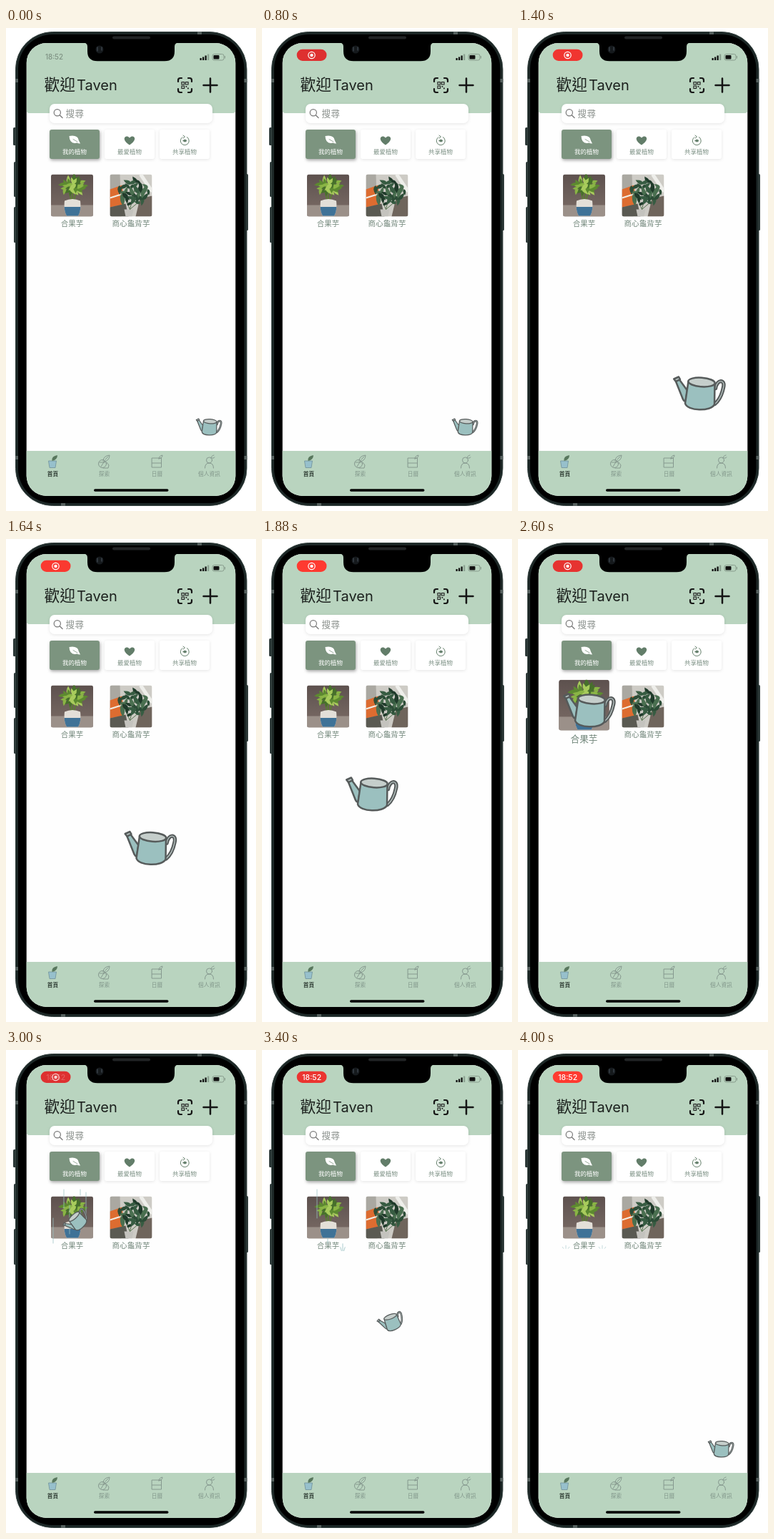
An HTML page that plays this animation: 350x675 px, repeating every 4040 ms.

```html
<!DOCTYPE html>
<html lang="zh-Hant">
<head>
<meta charset="utf-8">
<title>植物</title>
<style>
  html, body { margin: 0; width: 100%; height: 100%; overflow: hidden; background: #fff; }
  svg { display: block; }
  text { font-family: Inter, 'Noto Sans CJK TC', 'Noto Sans CJK', sans-serif; }
  .mid { text-anchor: middle; }
  .line { fill: none; stroke-linecap: round; stroke-linejoin: round; }
  .card { filter: drop-shadow(0 1px 2px rgba(0, 0, 0, .1)); }
  .on { filter: drop-shadow(1px 2px 2px rgba(0, 0, 0, .34)); }
</style>
</head>
<body>
<svg width="350" height="675" viewBox="0 0 350 675">
  <defs>
    <clipPath id="screen"><rect x="28.700" y="21" width="292.600" height="633" rx="28"/></clipPath>
    <clipPath id="photo"><rect width="59" height="59" rx="3"/></clipPath>
    <linearGradient id="wall" x2="0" y2="1"><stop stop-color="#5d514e"/><stop offset="1" stop-color="#7c6d67"/></linearGradient>
  </defs>

  <!-- phone -->
  <g fill="#2b3837">
    <rect x="10" y="139" width="5" height="25" rx="1.5"/>
    <rect x="11" y="187" width="4" height="49" rx="1.5"/>
    <rect x="11" y="250" width="4" height="50" rx="1.5"/>
    <rect x="335" y="204" width="4" height="79" rx="1.5"/>
  </g>
  <rect x="13.500" y="5.500" width="323.500" height="662" rx="52" fill="#1c2726" stroke="#34413f"/>
  <rect x="17" y="9" width="316.500" height="655" rx="48" fill="#000"/>
  <g fill="#56615f">
    <rect x="13" y="71" width="4" height="5"/><rect x="333.500" y="71" width="4" height="5"/>
    <rect x="13" y="598" width="4" height="5"/><rect x="333.500" y="598" width="4" height="5"/>
    <rect x="77" y="664" width="6" height="4"/><rect x="268" y="5" width="6" height="4"/>
  </g>
  <rect x="149" y="11.500" width="53" height="4" rx="2" fill="#222526"/>

  <g clip-path="url(#screen)">
    <rect x="28" y="21" width="294" height="633" fill="#fefefe"/>
    <rect x="28.700" y="10" width="292.600" height="109" rx="4" fill="#b9d4bf"/>
    <rect x="28" y="591" width="294" height="63" fill="#b9d4bf"/>
  </g>
  <path d="M109 20.500Q114 21 114 26V32.500Q114 46.300 128 46.300H222Q236 46.300 236 32.500V26Q236 21 241 20.500Z"/>
  <circle cx="131" cy="30" r="5.500" fill="#15191c"/>
  <path class="line" d="M128 27v5M134 27v4" stroke="#384047" stroke-width="1.500"/>

  <!-- status bar -->
  <text id="clock" class="mid" x="67.500" y="43.500" font-size="9.800" font-weight="500" fill="#7e9183">18:52</text>
  <g id="pill">
    <rect id="pillBox" x="48.700" y="29.700" width="41.800" height="16.200" rx="8"/>
    <g id="rec"><circle cx="69.500" cy="38" r="4.700" fill="none" stroke="#fff" stroke-width="1.200"/><circle cx="69.500" cy="38" r="2.200" fill="#fff"/></g>
    <text id="pillTime" class="mid" x="69.700" y="41.700" font-size="10.500" font-weight="500" fill="#fff">18:52</text>
  </g>
  <path d="M271.500 42h2.300v3h-2.300zM275 40.500h2.300v4.500h-2.300zM278.500 38.500h2.300v6.500h-2.300z" fill="#111"/>
  <path d="M282 36.500h2.300v8.500h-2.300z" fill="#8ca292"/>
  <rect x="289" y="36.500" width="16" height="8.500" rx="2.500" fill="none" stroke="#879b8c"/>
  <rect x="290.500" y="38" width="8" height="5.500" rx="1" fill="#111"/>
  <path d="M306.500 39v3.500" stroke="#879b8c"/>

  <!-- header -->
  <text x="53.500" y="87" font-size="21.700" fill="#1c211e">歡迎</text>
  <text x="99" y="87" font-size="20" fill="#1c211e">Taven</text>
  <g class="line" stroke="#151515" stroke-width="2.200">
    <path d="M241 75v-2q0-3 3-3h2M255 70h2q3 0 3 3v2M260 85v2q0 3-3 3h-2M246 90h-2q-3 0-3-3v-2"/>
    <path d="M276.500 80h19M286 70.500v19" stroke-width="2.500"/>
  </g>
  <path d="M246 75.500h3.500v3.500h-3.500zM251.500 75.500h3.500v3.500h-3.500zM246 81h3.500v3.500h-3.500z" fill="none" stroke="#222" stroke-width="1.200"/>
  <path d="M251.500 81h1.800v1.800h-1.800zM254 83.500h1.800v1.800h-1.800z" fill="#222"/>
  <rect class="card" x="61" y="106" width="228" height="27" rx="7" fill="#fff"/>
  <path class="line" d="M75.500 122l3.500 3.500" stroke="#777" stroke-width="1.300"/>
  <circle cx="71.800" cy="118.300" r="4.600" fill="none" stroke="#777" stroke-width="1.200"/>
  <text x="83.500" y="124" font-size="12.700" fill="#8b918d">搜尋</text>

  <!-- filters -->
  <rect class="on" x="61" y="142" width="70" height="41" rx="3" fill="#7c947f"/>
  <rect class="card" x="138" y="142" width="70" height="41" rx="3" fill="#fff"/>
  <rect class="card" x="215" y="142" width="70" height="41" rx="3" fill="#fff"/>
  <path d="M88.500 151Q101 149 102 157.500L104 161.500Q101 161.500 99.500 160.500Q89 163 88.500 151Z" fill="#fff"/>
  <path class="line" d="M94 155.500l6 3.500" stroke="#7c947f" stroke-width=".8"/>
  <path d="M173 163.500C159 154 169 148 173 153.500C177 148 187 154 173 163.500Z" fill="#627d69"/>
  <g class="line" stroke="#627d69" stroke-width="1">
    <path d="M247 152.500a6 6 0 1 0 6.500 0M248 150l2.500 2-2.500 2"/>
    <path d="M248 157.500q2.500-3 5 0q-2.500 3-5 0Z" fill="#627d69"/>
  </g>
  <g class="mid" font-size="8.500" fill="#7c9084">
    <text x="96" y="175.500" fill="#fff">我的植物</text>
    <text x="173" y="175.500">最愛植物</text>
    <text x="250" y="175.500">共享植物</text>
  </g>

  <!-- plants -->
  <g id="plantA">
    <g transform="translate(63 204.500)" clip-path="url(#photo)">
      <rect width="59" height="59" fill="url(#wall)"/>
      <rect y="43" width="59" height="16" fill="#9b9089"/>
      <path d="M28 36L24 18M30 36V14M32 36L38 18" fill="none" stroke="#5c7c34" stroke-width="1.800"/>
      <g id="leavesA"></g>
      <path d="M19 37Q30 32 41 37Q42.500 50 38 58H22Q17.500 50 19 37Z" fill="#e3dfd8"/>
      <path d="M18.700 45.500H41.300Q41 53 38 58H22Q19 53 18.700 45.500Z" fill="#3f7297"/>
    </g>
    <text class="mid" x="92.500" y="277" font-size="10.500" fill="#71867a">合果芋</text>
  </g>
  <g transform="translate(145.500 204.500)" clip-path="url(#photo)">
    <rect width="59" height="59" fill="#cdcbc5"/>
    <path d="M0 0H14L16 59H0Z" fill="#aaa8a1"/>
    <path d="M0 21L17 15L20 42L0 46Z" fill="#dd6c30"/>
    <path d="M0 33L19 27" stroke="#f1ede4" stroke-width="2"/>
    <path d="M0 46L22 41L26 59H0Z" fill="#5a5a52"/>
    <path d="M42 34L59 30V59H36Z" fill="#6f655c"/>
    <path d="M43 0L59 24" stroke="#eeeeea" stroke-width="5"/>
    <path d="M20 49H33L31 59H22Z" fill="#c4c3be"/>
    <path class="line" d="M28 49L16 22M28 49L36 16M28 49L48 32" stroke="#56724f"/>
    <g id="leavesB"></g>
  </g>
  <text class="mid" x="175" y="277" font-size="10.600" fill="#71867a">商心龜背芋</text>

  <!-- tab bar -->
  <path d="M59.500 605H70.500L69 614.500H61Z" fill="#97c0cc" stroke="#70919a" stroke-width=".8"/>
  <path d="M64.500 605Q63.500 598 72 597Q72 603.500 64.500 605Z" fill="#58775d"/>
  <g class="line" stroke="#81928a" stroke-width=".9">
    <circle cx="135" cy="609" r="5.500"/><path d="M131 607h8M133 613l5-8M136 605Q136 598 145 597Q145 605 137 606M139 603l4-4M141 607l3 4-1 4h-7"/>
    <path d="M204.500 601H217.500V614H204.500ZM204.500 608H217.500M214 602q0-4 5-5q0 4-5 5"/>
    <circle cx="284.500" cy="604" r="4"/><path d="M278.500 615q0-7 6-7t6 7M287 601q0-3 4-4M288 601q2 1 4-1"/>
  </g>
  <g class="mid" font-size="7.700" fill="#81968a">
    <text x="65.500" y="625.500" font-weight="600" fill="#35433a">首頁</text>
    <text x="137.500" y="625.500">探索</text>
    <text x="211.500" y="625.500">日曆</text>
    <text x="284.500" y="625.500">個人資訊</text>
  </g>
  <rect x="123" y="644.200" width="104.500" height="3.600" rx="1.800"/>

  <g class="line" stroke="#9bc3c5">
    <path id="rain" opacity=".75"/>
    <g id="splashes"></g>
  </g>

  <g id="can" class="line">
    <path d="M23 -7C25 -20 37 -20 34 -8C32 2 28 10 22 15" stroke="#565b5b" stroke-width="5.400"/>
    <path d="M23 -7C25 -20 37 -20 34 -8C32 2 28 10 22 15" stroke="#b7c3c1" stroke-width="1.300"/>
    <g stroke="#565b5b" stroke-width="2.500">
      <path d="M-32.500 -16.500L-27.500 -19L-16.500 -4L-19 11.500Q-21.500 11 -22.500 8.500Z" fill="#9bc0bf"/>
      <path d="M-35.300 -20L-28.500 -23L-26.500 -19.500L-32.500 -16.500Z" fill="#b7c3c1"/>
      <path d="M-15 -16.500L-19.500 14C-17 25 17 26 21.500 15.500L22 -13.500Z" fill="#9bc0bf"/>
      <ellipse cx="3.500" cy="-15.500" rx="18.700" ry="6.300" transform="rotate(4 3.500 -15.500)" fill="#c5cecb"/>
    </g>
  </g>
</svg>
<script>
const LOOP = 4040;
const $ = id => document.getElementById(id);
const clamp = v => Math.min(1, Math.max(0, v));
const smooth = v => v * v * (3 - 2 * v);
const ramp = (t, a, b) => smooth(clamp((t - a) / (b - a)));
const mix = (a, b, p) => a + (b - a) * p;

function seeded(seed) {
  return () => (seed = (seed * 16807) % 2147483647) / 2147483647;
}

// Leaves spiral out from one centre; jitter loosens their direction
function foliage(id, count, cx, cy, rx, ry, size, jitter, colours, seed) {
  const rnd = seeded(seed);
  let out = '';
  for (let i = 0; i < count; i++) {
    const a = i * 2.4, r = Math.sqrt((count - i) / count);
    const x = cx + rx * r * Math.cos(a), y = cy + ry * r * Math.sin(a);
    const s = size * (0.75 + rnd() * 0.5), turn = a * 57.3 + (rnd() - 0.5) * jitter;
    out += `<path transform="translate(${x} ${y}) rotate(${turn}) scale(${s})"
      d="M-1 0Q-.5 -.9 1 0Q-.5 .9 -1 0Z" fill="${colours[i % colours.length]}"/>`;
  }
  $(id).innerHTML = out;
}
foliage('leavesA', 28, 31, 16, 17, 12, 5.5, 80, ['#5d8a30', '#8ab545', '#47702b', '#a8cb5c'], 11);
foliage('leavesB', 34, 33, 25, 21, 18, 5.8, 260, ['#2c4d37', '#4a6f50', '#203b2b', '#375c42'], 29);

// time, x, y of the held can
const DRAG = [
  [1040, 284, 557.5], [1120, 282, 556], [1260, 270, 538], [1400, 253.5, 510.5],
  [1640, 202, 432], [1880, 153.5, 356.5], [2080, 119, 276], [2260, 102, 244], [2400, 99.5, 239.5]
];

function along(path, t) {
  const i = path.findIndex(k => k[0] > t);
  if (i === 0) return path[0].slice(1);
  if (i < 0) return path[path.length - 1].slice(1);
  const a = path[i - 1], b = path[i], p = (t - a[0]) / (b[0] - a[0]);
  return [mix(a[1], b[1], p), mix(a[2], b[2], p)];
}

// x and start time of each drop
const DROPS = [[113, 3130], [92, 3184], [77, 3320], [67, 3670], [118, 3670]];
for (let i = 0; i < 6; i++) {
  DROPS.push([66 + i * 23 % 54, 2840 + i * 36], [70 + i * 31 % 50, 3410 + i * 42]);
}
const FALL = 300, TOP = 195, GROUND = 270;

function drawRain(t) {
  let lines = '', splashes = '';
  for (const [x, start] of DROPS) {
    const u = (t - start) / FALL;
    if (u < 0 || u > 1.25) continue;
    const head = Math.min(GROUND, TOP + 150 * u), tail = Math.max(TOP, TOP - 40 + 150 * u);
    if (tail < head) lines += `M${x} ${tail}V${head}`;
    const s = (u - 0.75) / 0.5;
    if (s > 0) {
      const out = 0.5 + 4 * s, base = 283 - 8 * s, len = 7 * (1 - s);
      splashes += `<path opacity="${1 - s * 0.6}" d="M${x - out} ${base}l-1.5 ${-len}
        M${x + out} ${base}l1.5 ${-len}M${x} ${base}v${-len * 2}"/>`;
    }
  }
  $('rain').setAttribute('d', lines);
  $('splashes').innerHTML = splashes;
}

function drawCan(t) {
  const back = ramp(t, 3302, 3514);
  const [hx, hy] = along(DRAG, t);
  const x = mix(hx, 284, back), y = mix(hy, 557.5, back);
  const size = 0.5 + 0.5 * (ramp(t, 1040, 1160) - ramp(t, 2740, 2860));
  const tilt = -45 * ramp(t, 2800, 2960) * (1 - back);
  $('can').setAttribute('transform', `translate(${x} ${y}) rotate(${tilt}) scale(${size})`);
}

function drawPlant(t) {
  const s = 1 + 0.2 * (ramp(t, 2140, 2280) - ramp(t, 2740, 2860));
  $('plantA').setAttribute('transform', `translate(92.5 243) scale(${s}) translate(-92.5 -243)`);
}

function drawPill(t) {
  const show = t < 40 ? 0 : mix(0.4, 1, ramp(t, 40, 200));
  const glow = 0.5 + 0.5 * Math.cos((t - 1900) / 2100 * 2 * Math.PI);
  const time = ramp(t, 2940, 3140);
  $('clock').setAttribute('opacity', 1 - ramp(t, 20, 100));
  $('pill').setAttribute('opacity', show);
  $('pillBox').setAttribute('fill', `rgb(${mix(222, 255, glow)},${mix(48, 58, glow)},48)`);
  $('rec').setAttribute('opacity', 1 - time);
  $('pillTime').setAttribute('opacity', time);
}

let origin;
function frame(now) {
  origin ??= now;
  const t = (now - origin) % LOOP;
  drawPill(t);
  drawPlant(t);
  drawRain(t);
  drawCan(t);
  requestAnimationFrame(frame);
}
requestAnimationFrame(frame);
</script>
</body>
</html>
```
